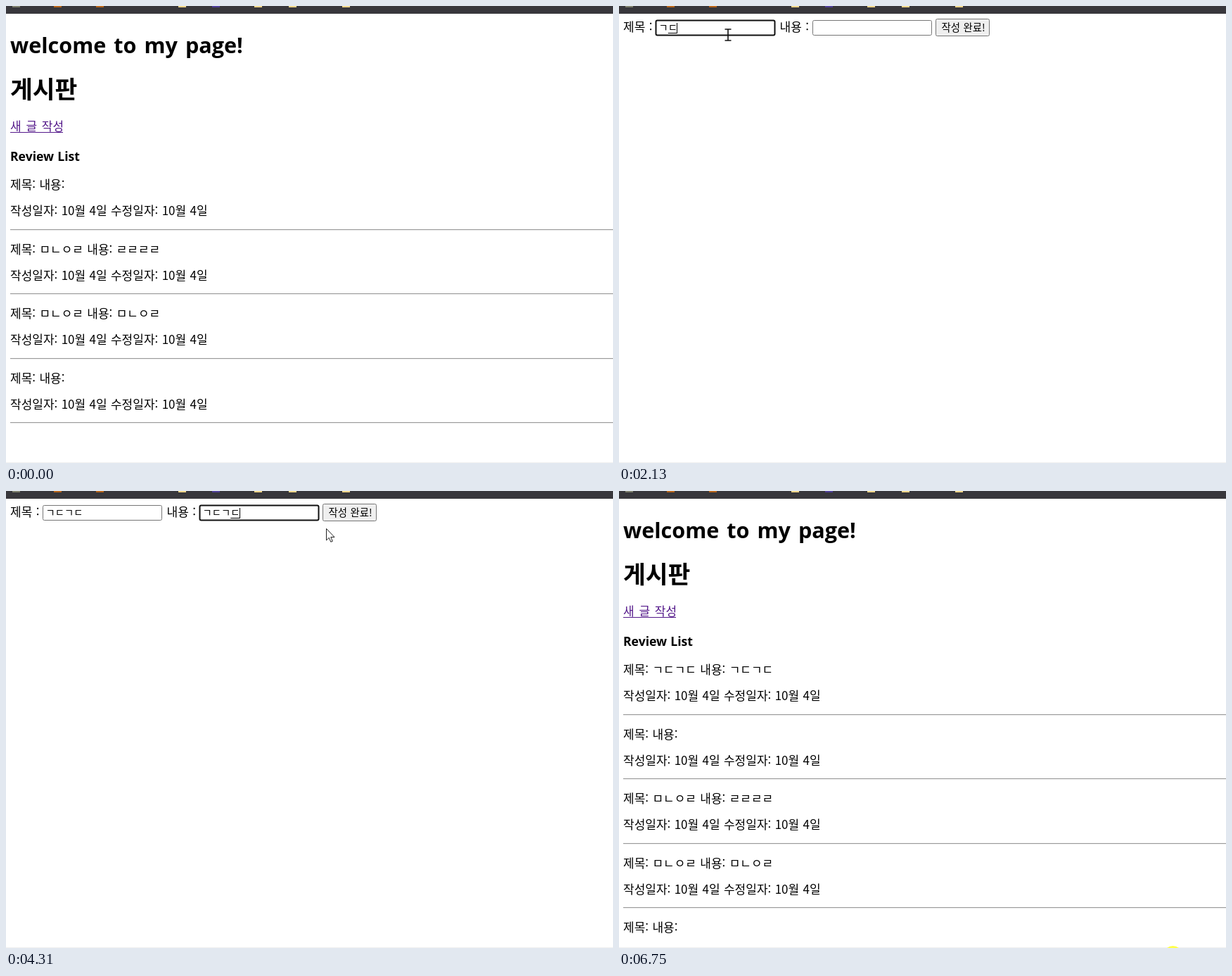
Recreate the animation shown at these times as an HTML page. Size 863x649 px, loop 6.83 s.

```html
<!DOCTYPE html>
<html lang="ko">
<head>
<meta charset="utf-8">
<title>게시판</title>
<style>
html, body { margin: 0; width: 100%; height: 100%; overflow: hidden; background: #fff; }
svg { display: block; width: 863px; height: 649px; }
text { font: 300 17px "Noto Sans CJK KR", "Noto Sans CJK JP", sans-serif; word-spacing: .6px; white-space: pre; }
.title { font: 700 30.6px "Open Sans", "Noto Sans", sans-serif; word-spacing: 3px; }
.board { font-size: 34.6px; font-weight: 700; }
.sub { font: 700 17.6px "Open Sans", "Noto Sans", sans-serif; word-spacing: .6px; }
.link { fill: #551a8b; word-spacing: 2px; }
.small { font-size: 14.4px; word-spacing: .4px; }
</style>
</head>
<body>
<svg id="stage" viewBox="0 0 863 649"></svg>
<script>
const LOOP = 6830, STEP = 70;
const stage = document.getElementById('stage');

function add(parent, tag, attrs = {}, content = '') {
  const el = document.createElementNS('http://www.w3.org/2000/svg', tag);
  for (const k in attrs) el.setAttribute(k, attrs[k]);
  el.textContent = content;
  parent.append(el);
  return el;
}
const group = () => add(stage, 'g');
const rect = (g, x, y, width, height, fill, more) =>
  add(g, 'rect', { x, y, width, height, fill, ...more });
const text = (g, x, y, str, cls = '') => add(g, 'text', { x, y, class: cls }, str);
const show = (el, on) => { el.style.display = on ? '' : 'none'; };
const within = (v, from, to) => v >= from && v < to;

// Board page
function makeBoard(posts) {
  const g = group();
  text(g, 6, 67, 'welcome to my page!', 'title');
  text(g, 6, 130.5, '게시판', 'board');
  text(g, 6, 177, '새 글 작성', 'link');
  rect(g, 6, 179, 75, 1, '#551a8b');
  text(g, 6, 220, 'Review List', 'sub');
  posts.forEach(([title, body], i) => {
    const y = i * 91.6, rule = 317 + Math.floor(i * 91.5);
    text(g, 6, 260 + y, `제목: ${title && title + ' '}내용: ${body}`);
    text(g, 6, 297 + y, '작성일자: 10월 4일 수정일자: 10월 4일');
    rect(g, 6, rule, 857, 1, '#9a9a9a');
    rect(g, 6, rule + 1, 857, 1, '#eee');
  });
  return g;
}
const WORD = 'ㄱㄷㄱㄷ';
const posts = [['', ''], ['ㅁㄴㅇㄹ', 'ㄹㄹㄹㄹ'], ['ㅁㄴㅇㄹ', 'ㅁㄴㅇㄹ'], ['', '']];
const oldBoard = makeBoard(posts);
const newBoard = makeBoard([[WORD, WORD], ...posts]);

// Form page
const form = group();
const CHAR = 14.4 * .92;

function makeField(x) {
  const border = rect(form, x + .5, 20.5, 169, 21, '#fff', { rx: 2 });
  const value = text(form, x + 4.5, 36, '', 'small');
  const line = rect(form, 0, 38, CHAR, 1, '#000');
  const caret = rect(form, 0, 24, 1, 15, '#000');
  return (count, focused, caretOn) => {
    border.setAttribute('stroke', focused ? '#101010' : '#767676');
    border.setAttribute('stroke-width', focused ? 2 : 1);
    value.textContent = WORD.slice(0, count);
    const end = x + 4.5 + count * CHAR;
    line.setAttribute('x', end - CHAR);
    caret.setAttribute('x', Math.round(end - .5));
    show(line, focused && count);
    show(caret, focused && caretOn);
  };
}
text(form, 6, 36, '제목 :');
text(form, 228.5, 36, '내용 :');
const setTitle = makeField(52);
const setBody = makeField(275);
const button = rect(form, 450.5, 18.5, 76, 24, '', { rx: 2 });
text(form, 458.5, 35.5, '작성 완료!', 'small');

// Browser edges
rect(stage, 0, 0, 863, 11, '#38373c');
const bookmarks = {
  '#f5d58a': [245, 353, 402, 478], '#b8651b': [68, 128], '#7d7f6d': [9], '#4f3f99': [293]
};
for (const color in bookmarks)
  for (const x of bookmarks[color]) rect(stage, x, 0, 11, 2, color);
rect(stage, 0, 648, 863, 1, '#f0f0f0');

const glow = add(stage, 'circle', { cx: 787.5, cy: 659.5, r: 13.5, fill: '#ffff4a' });

// Pointer
const arrow = add(stage, 'path', {
  d: 'M.5.5V17L4.3 13.4 6.8 19.3 9.3 18.3 6.8 12.5H12Z', fill: '#fff', stroke: '#222'
});
const beam = add(stage, 'path', {
  d: 'M-4.5-8H4.5M0-8V8M-4.5 8H4.5', stroke: '#111', 'stroke-width': 1.6
});

// Each stop: arrival time, rest, x, y
const stops = [
  [70, 0, 741, 632], [800, 250, 54, 174], [1200, 50, 57, 195], [1600, 930, 155, 41],
  [3100, 120, 321, 43], [3400, 200, 332, 33], [4180, 170, 455, 53], [4600, 800, 460, 35],
  [5460, 20, 448, 81], [5700, 50, 191, 262], [6130, 20, 747, 591], [6300, 120, 771, 640]
];
function pointerAt(t) {
  const i = stops.findLastIndex(s => t >= s[0]);
  if (i < 0) return null;
  const [at, rest, x, y] = stops[i], next = stops[i + 1], leave = at + rest;
  if (t <= leave) return [x, y];
  if (!next) return null;
  const k = (t - leave) / (next[0] - leave), e = k * k * (3 - 2 * k);
  return [Math.round(x + (next[2] - x) * e), Math.round(y + (next[3] - y) * e)];
}

const keys = (t, start, gap, max) =>
  Math.max(0, Math.min(max, Math.floor((t - start) / gap) + 1));

function draw(t) {
  const onForm = within(t, 1180, 4800);
  show(oldBoard, t < 1180);
  show(form, onForm);
  show(newBoard, t >= 4800);

  setTitle(keys(t, 1880, 220, 2) + keys(t, 2530, 220, 2), within(t, 1600, 3480),
    !within(t, 2330, 2530) && t < 3140);
  setBody(keys(t, 3840, 140, 4), within(t, 3480, 4720), true);

  const pos = pointerAt(Math.floor(t / STEP) * STEP);
  const [x, y] = pos || [0, 0];
  const inField = onForm && within(y, 20, 42) && (within(x, 52, 222) || within(x, 275, 445));
  const hover = onForm && within(x, 450, 527) && within(y, 18, 43);
  button.setAttribute('fill', hover ? '#e5e5e5' : '#efefef');
  button.setAttribute('stroke', hover ? '#4f4f4f' : '#767676');
  show(arrow, pos && !inField);
  show(beam, pos && inField);
  for (const el of [arrow, beam]) el.setAttribute('transform', `translate(${x} ${y})`);
  show(glow, t >= 6750);
}

const start = performance.now();
function tick() {
  draw((performance.now() - start) % LOOP);
  requestAnimationFrame(tick);
}
tick();
</script>
</body>
</html>
```
